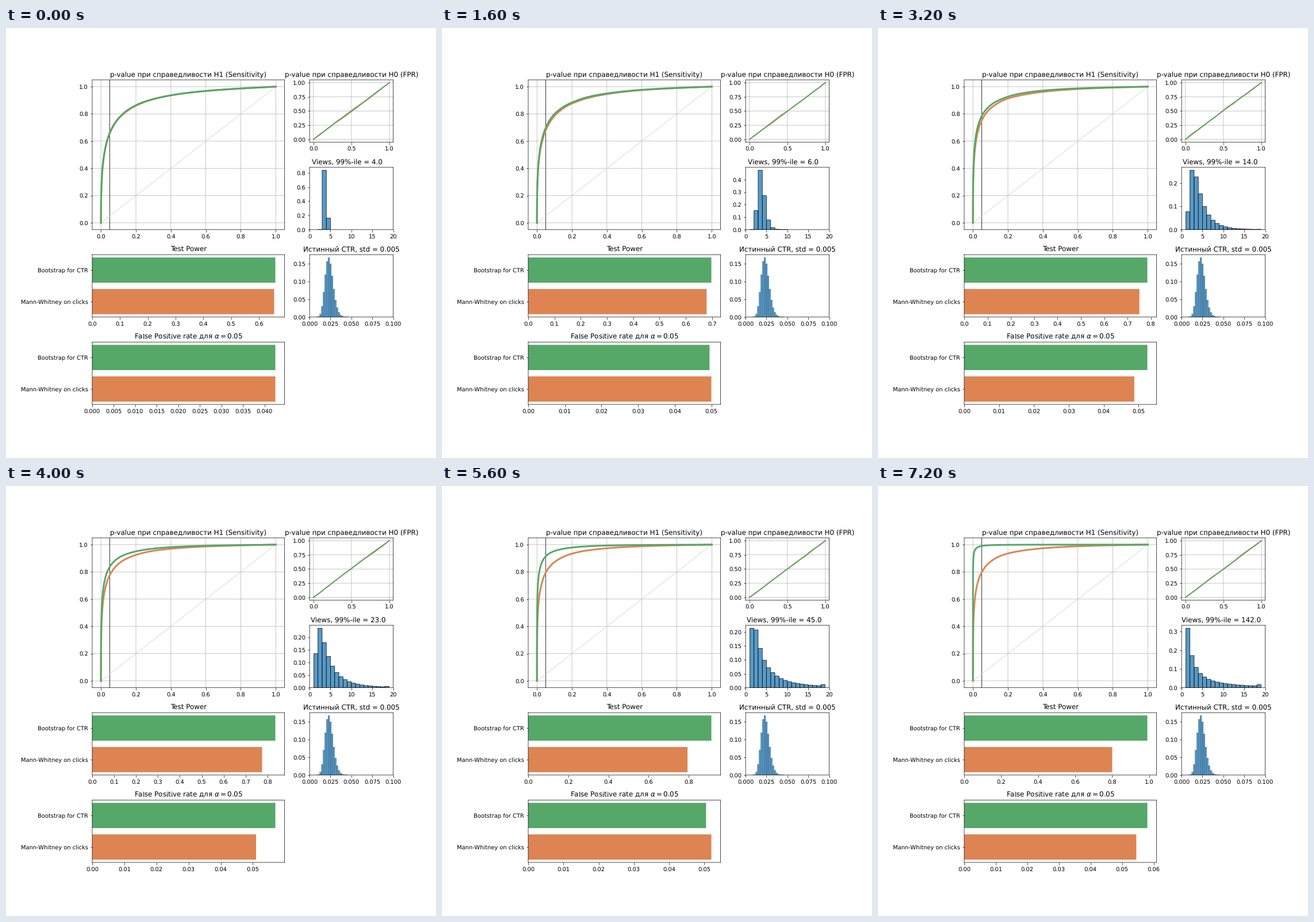
These frames come from a looping animation (748 by 748 pixels, 8000 ms). A matplotlib script:

```python
import math

import matplotlib.pyplot as plt
import numpy as np
from matplotlib.animation import FuncAnimation

SIZE, DPI, STEPS = 748, 72, 10
GREEN, ORANGE, BLUE = "#55a868", "#dd8452", "#1f77b4"
TESTS = ["Mann-Whitney on clicks", "Bootstrap for CTR"]
COLORS = [ORANGE, GREEN]
ALPHA_Z = 1.96

# Key points over the steps; everything between is linear.
KEY_STEPS = [0, 2, 3, 5, 7, 9]
SIGMA_KEYS = [0.1, 0.3, 0.5, 0.9, 1.2, 1.7]
FPR_KEYS = [[0.0425, 0.05, 0.0465, 0.051, 0.052, 0.0545],
            [0.0425, 0.0495, 0.048, 0.057, 0.0505, 0.058]]

# Thin lines and text at subpixel positions.
plt.rcParams.update({
    "font.size": 9.9, "text.hinting": "none", "path.snap": False,
    "axes.linewidth": 0.71, "grid.linewidth": 0.71,
    "xtick.major.width": 0.71, "ytick.major.width": 0.71,
})

erf = np.vectorize(math.erf)


def phi(z):
    return 0.5 * (1 + erf(np.asarray(z, float) / math.sqrt(2)))


def power(shift, z):
    """Chance that a shifted two-sided z statistic exceeds z."""
    return phi(shift - z) + phi(-shift - z)


def test_shifts(sigma):
    """Effect in z units: one test levels off, the other keeps growing."""
    mann_whitney = 2.804 - 0.455 * math.exp(-(sigma / 0.7) ** 2)
    bootstrap = 2.32 + 0.5 * sigma + 0.23 * sigma ** 3
    return mann_whitney, bootstrap


def at_step(step, keys):
    return np.interp(step, KEY_STEPS, keys)


def wobble(y, rng, scale):
    """Brownian bridge of a 2000-sample empirical distribution."""
    k = np.arange(1, 41)
    waves = np.sin(np.pi * np.outer(y, k)) / k
    noise = waves @ rng.normal(size=k.size) * math.sqrt(2) / math.pi
    return y + scale * noise / math.sqrt(2000)


def beta_shares(edges, a=23.5, b=970):
    mid = (edges[:-1] + edges[1:]) / 2
    log_pdf = (math.lgamma(a + b) - math.lgamma(a) - math.lgamma(b)
               + (a - 1) * np.log(mid) + (b - 1) * np.log1p(-mid))
    return np.exp(log_pdf) * np.diff(edges)


def view_shares(sigma):
    """Shares of 1..18 log-normal views; the last bin also takes 19."""
    cdf = phi((np.log(np.arange(1, 20)) - 1) / sigma)
    upper = np.append(cdf[:17], cdf[18])
    return np.diff(upper, prepend=0) / cdf[18]


fig = plt.figure(figsize=(SIZE / DPI, SIZE / DPI), dpi=DPI, facecolor="white")
grid = fig.add_gridspec(4, 3, left=0.2005, right=0.9005, bottom=0.1245,
                        top=0.8795, wspace=0.3, hspace=0.4)
ax_h1 = fig.add_subplot(grid[:2, :2])
ax_h0 = fig.add_subplot(grid[0, 2])
ax_views = fig.add_subplot(grid[1, 2])
ax_power = fig.add_subplot(grid[2, :2])
ax_ctr = fig.add_subplot(grid[2, 2])
ax_fpr = fig.add_subplot(grid[3, :2])


def draw_curves(step, shifts):
    rng = np.random.default_rng(step)
    z = np.linspace(0, 7, 400)
    u = np.linspace(0, 1, 200)
    ax_h1.axvline(0.05, color="black", lw=0.8)
    ax_h1.plot([0, 1], [0, 1], color="lightgray", lw=0.8)
    for shift, color in zip(shifts, COLORS):
        ax_h1.plot(power(0, z), wobble(power(shift, z), rng, 0.25),
                   color=color, lw=3)
        ax_h0.plot(u, wobble(u, rng, 0.6), color=color, lw=1.8)
    for ax in (ax_h1, ax_h0):
        ax.set(xlim=(-0.05, 1.05), ylim=(-0.05, 1.05))
        ax.grid(True)
    ax_h1.set_title("p-value при справедливости H1 (Sensitivity)")
    ax_h0.set_title("p-value при справедливости H0 (FPR)")


def draw_hist(ax, edges, shares, limit, lw, title):
    keep = shares > 1e-4
    ax.bar(edges[keep], shares[keep], edges[1] - edges[0], align="edge",
           color=(BLUE, 0.75), edgecolor="black", lw=lw)
    ax.set(xlim=(0, limit), ylim=(0, shares.max() * 1.05))
    ax.set_title(title)


def draw_bars(ax, values, title):
    ax.barh(TESTS, values, color=COLORS)
    ax.set_xlim(0, max(values) * 1.05)
    ax.set_title(title)


def draw(step):
    for ax in fig.axes:
        ax.clear()
    sigma = at_step(step, SIGMA_KEYS)
    shifts = test_shifts(sigma)
    draw_curves(step, shifts)

    top = float(math.floor(math.exp(1 + 2.3263 * sigma)) + 1)
    draw_hist(ax_views, np.arange(1, 19), view_shares(sigma), 20, 0.7,
              f"Views, 99%-ile = {top:<7}")
    edges = np.arange(1, 26) * 0.002
    draw_hist(ax_ctr, edges[:-1], beta_shares(edges), 0.1, 0.2,
              "Истинный CTR, std = 0.005")

    draw_bars(ax_power, [float(power(s, ALPHA_Z)) for s in shifts],
              "Test Power")
    draw_bars(ax_fpr, [at_step(step, keys) for keys in FPR_KEYS],
              r"False Positive rate для $\alpha=0.05$")
    return []


anim = FuncAnimation(fig, draw, frames=STEPS, interval=800, repeat=True)
plt.show()
```
